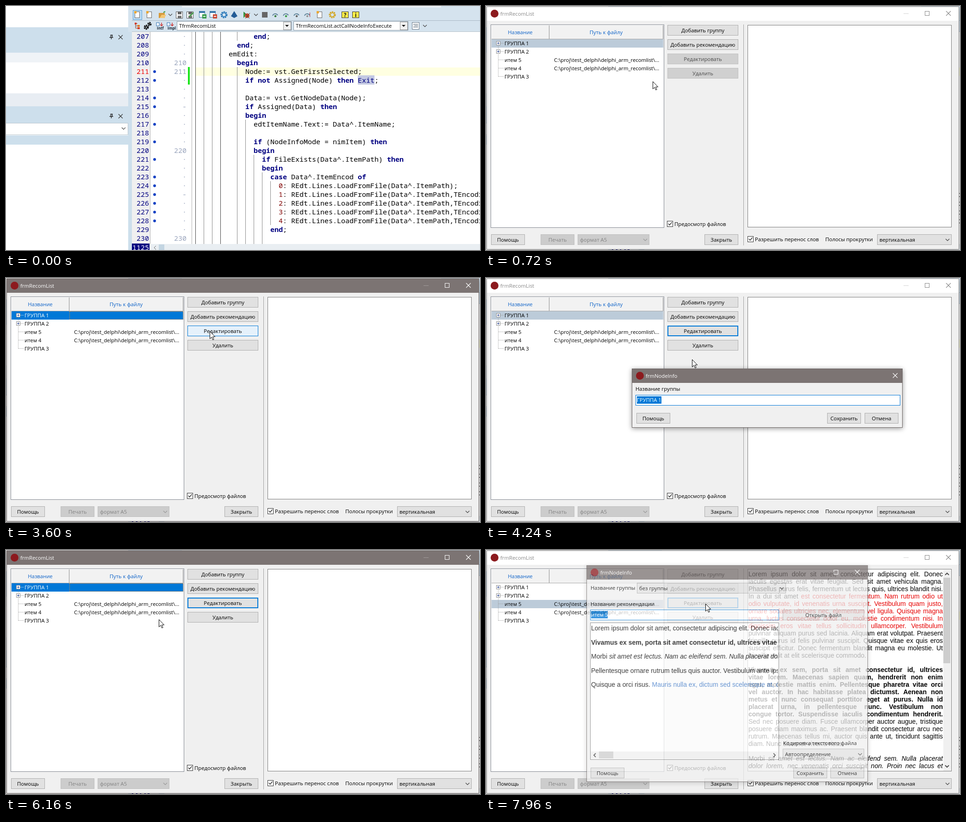
Recreate the animation shown at these times as an HTML page. Size 1024x528 px, loop 8 s.

```html
<!DOCTYPE html>
<html lang="ru">
<head>
<meta charset="utf-8">
<title>frmRecomList</title>
<style>
html, body { margin: 0; width: 100%; height: 100%; overflow: hidden; background: #fff; }
#stage { left: 0; top: 0; width: 1024px; height: 528px; overflow: hidden; }
div, svg { position: absolute; box-sizing: border-box; white-space: pre; }
svg { left: 0; top: 0; }
#stage { font: 11.3px/18px "Open Sans", "Noto Sans", sans-serif; color: #000; }
.mono { font: 15px/19px "Noto Sans Mono", "DejaVu Sans Mono", monospace; }
.mono b { color: #000080; }
.rich { font: 14px/16px "Liberation Sans", Arial, sans-serif; white-space: nowrap; }
.btn { background: #e1e1e1; border: 1px solid #adadad; text-align: center; line-height: 21px; }
.off { background: #ccc; border-color: #bfbfbf; color: #838383; }
.dim { color: #4a4a4a; background: #d0d0d0; }
.hot { background: #e5f1fb; border-color: #0078d7; }
.warm { background: #e3e9f0; border-color: #7aa5cc; }
.foc { border: 2px solid #0078d7; line-height: 19px; }
</style>
</head>
<body>
<div id="stage"><div id="ide"></div><div id="front"></div></div>
<script>
const box = (x, y, w, h, css = '', body = '', cls = '') =>
  `<div class="${cls}" style="left:${x}px;top:${y}px;width:${w}px;height:${h}px;${css}">${body}</div>`;
const fill = (x, y, w, h, color) => box(x, y, w, h, 'background:' + color);
const text = (x, cy, s, css = '') => `<div style="left:${x}px;top:${cy - 9}px;${css}">${s}</div>`;
const mono = (x, cy, s, css = '') => `<div class="mono" style="left:${x}px;top:${cy - 10}px;${css}">${s}</div>`;
const svg = body => `<svg width="1024" height="528" fill="none">${body}</svg>`;
const path = (d, color, w = 1, paint = 'none') => `<path d="${d}" stroke="${color}" stroke-width="${w}" fill="${paint}"/>`;
const draw = (...a) => svg(path(...a));
const chevron = (x, y, c = '#444') => draw(`M${x - 4} ${y - 2}l4 4l4 -4`, c, 1.2);
const button = (x, y, w, s, cls = '') => box(x, y, w, 23, '', s, 'btn ' + cls);
const combo = (x, y, w, s, cls = '') => box(x, y, w, 23, 'text-align:left;padding-left:4px', s, 'btn ' + cls) +
  chevron(x + w - 9, y + 12, cls ? '#999' : '#444');
const check = (x, cy, s) => box(x, cy - 7, 13, 13, 'background:#fff;border:1px solid #333') +
  draw(`M${x + 3} ${cy - 1}l2.5 3l5 -6`, '#222', 1.3) + text(x + 16, cy, s);

// ---- Code editor behind the windows ----
const load = n => [20, n + ': REdt.Lines.LoadFromFile(Data^.ItemPath' + (n ? ',TEncoding' : ');')];
const code = [[14, 'end;'], [10, 'end;'], [8, 'emEdit:'], [10, 'begin'],
  [12, 'Node:= vst.GetFirstSelected;'], [12, 'if not Assigned(Node) then Exit;'], [0, ''],
  [12, 'Data:= vst.GetNodeData(Node);'], [12, 'if Assigned(Data) then'], [12, 'begin'],
  [14, 'edtItemName.Text:= Data^.ItemName;'], [0, ''], [14, 'if (NodeInfoMode = nimItem) then'],
  [14, 'begin'], [16, 'if FileExists(Data^.ItemPath) then'], [16, 'begin'],
  [18, 'case Data^.ItemEncod of'], ...[0, 1, 2, 3, 4].map(load), [18, 'end;'], [0, '']];
const paint = s => s.replace(/\b(begin|end|if|not|then|case|of)\b/g, '<b>$1</b>')
  .replace(/^(\d)/, '<span style="color:#800000">$1</span>')
  .replace('Exit', '<span style="color:#000080;background:#c4c9e2">Exit</span>');

function editor() {
  let h = fill(272, 56, 40, 459, '#f0f0f0') + fill(311, 56, 1, 459, '#b4b4b4') +
    fill(410, 133, 614, 18, '#ffffe1') + fill(393, 132, 4, 38, '#1ee61e') +
    fill(401, 56, 1, 459, '#b0b0b0');
  const guides = [[409, 56, 515], [427, 56, 515], [445, 56, 515], [463, 56, 515], [499, 56, 75],
    [499, 132, 515], [517, 246, 515], [535, 322, 515], [553, 360, 515], [571, 379, 474]];
  guides.forEach(([x, a, b]) => h += fill(x, a, 1, b - a, x == 409 || x == 463 ? '#444' : '#8a8a8a'));
  code.forEach(([col, s], i) => {
    const n = 207 + i, y = 66 + 19 * i;
    const mark = n % 10 == 0 || n == 211 ? n : n % 5 ? '·' : '-';
    h += mono(282, y, n, `color:${n == 211 ? '#f00000' : '#000080'}`) +
      mono(350, y, mark, 'width:40px;text-align:right;color:#9aa5bd') +
      mono(409 + 9 * col, y, paint(s));
    if (n > 210 && s && !/^(begin|end)/.test(s))
      h += box(318, y - 3, 6, 6, 'border-radius:3px;background:#1643c4');
  });
  return h + fill(272, 515, 752, 13, '#e9eef2') + fill(330, 516, 12, 12, '#c3d5e2') +
    draw('M324 519l-4 4l4 4', '#666') + fill(272, 514, 38, 14, '#000080') + mono(273, 523, '1125', 'color:#fff');
}

function toolbar() {
  const r = (x, y, w, h, f, s = 'none') => `<rect x="${x}" y="${y}" width="${w}" height="${h}" fill="${f}" stroke="${s}"/>`;
  const page = x => r(x - 5.5, 12.5, 10, 13, '#fff', '#666') + r(x - 7, 11, 5, 5, '#eca832');
  const disk = x => r(x - 7.5, 12.5, 14, 14, '#fff', '#555') + r(x - 4, 13, 8, 5, '#666') + r(x - 4, 21, 8, 5, '#777');
  const form = (x, c) => r(x - 7.5, 11.5, 12, 13, '#fff', '#3676a8') + r(x - 7, 12, 11, 3, '#3676a8') + r(x - 1, 18, 9, 9, c) +
    path(`M${x + 1} 22.5h5`, '#fff', 2);
  const gear = (x, y, q, c) => `<circle cx="${x}" cy="${y}" r="${q}" stroke="${c}" stroke-width="3" stroke-dasharray="3 1.4"/>` +
    `<circle cx="${x}" cy="${y}" r="${q - 2}" stroke="${c}" stroke-width="1.5"/>`;
  const step = (x, c) => path(`M${x - 6} 21a6 6 0 0 1 11 -1`, '#557b91', 1.6) + `<circle cx="${x}" cy="22" r="2.3" fill="${c}"/>`;
  const units = (x, s) => r(x - 8, 36, 6, 7, '#fff', '#2b6cb0') + path(`M${x + 3} 36v7m-3 -3l3 3l3 -3`, '#c33', 1.5) +
    `<text x="${x - 7}" y="51" font-size="8" font-weight="700" fill="#123">${s}</text>`;
  const help = (x, s) => r(x - 6.5, 12.5, 14, 13, '#fff04a', '#333') +
    `<text x="${x + .5}" y="23.5" font-size="12" font-weight="700" fill="#111" text-anchor="middle">${s}</text>`;
  const list = (x, s) => box(x, 33, 248, 20, 'background:#fff;border:1px solid #8b9aa6;padding-left:4px', s) +
    box(x + 230, 34, 17, 18, 'background:#f0f0f0;border:1px solid #999') +
    draw(`M${x + 234} 41h8l-4 4z`, 'none', 0, '#111');
  return fill(264, 0, 760, 56, '#d5e3ee') + fill(380, 0, 560, 3, '#eef3f7') + fill(272, 31, 752, 1, '#a9b8c4') + fill(272, 55, 752, 1, '#b5c1ca') +
    box(274, 9, 20, 21, 'background:#bcdcf4;border:1px solid #5a9fd4') +
    svg(page(284) + page(310) + r(330, 15, 13, 11, '#d69a3b') + path('M332 26l4 -7h10l-4 7z', 'none', 0, '#f3c673') +
      path('M340 14l4 -2', '#3b9b45', 2) + disk(375) + disk(398) + path('M396 23l9 -9', '#4b9c4f', 3) +
      form(425, '#359a48') + form(448, '#c94732') + gear(471, 19, 6, '#2475b8') +
      path('M493 11l7 11l-7 4l-7 -4z', 'none', 0, '#245c96') +
      path('M513 12v14l7 -7z', 'none', 0, '#3b9b45') + `<circle cx="521" cy="21" r="5" fill="#c74a2d"/>` + path('M515 14l11 13m1 -12l-10 12', '#493528') +
      r(553, 13, 12, 12, '#666') + step(582, '#3b7d42') + step(605, '#3b9b45') + step(628, '#666') + step(651, '#999') + path('M656.5 14v10', '#b34') +
      page(678) + gear(705, 19, 6, '#d2a520') + help(732, '?') + help(755, 'i') +
      path('M280 38h4m-4 0v10h5m-5 -5h5', '#8a3a20') + r(278, 36, 4, 4, '#d33c24') + r(284, 41, 5, 4, '#e07a22') + r(284, 46, 5, 4, '#d33c24') +
      gear(303, 46, 4, '#111') + gear(310, 39, 3, '#111') + units(333, 'Intf') + units(356, 'Impl') +
      r(877.5, 35.5, 15, 15, '#fff', '#678') + path('M880 39.5h10m-8 3h8m-10 3h10', '#456')) +
    chevron(355, 19) + chevron(540, 19) + chevron(905, 43) + list(369, 'TfrmRecomList') + list(621, 'TfrmRecomList.actCallNodeInfoExecute');
}

function panels() {
  const pin = y => draw(`M225.5 ${y - 4}h5m-4 0v5m3 -5v5m-6 0h8m-4 0v4`, '#222', 1.3) +
    draw(`M243 ${y - 4}l9 9m0 -9l-9 9`, '#333', 1.2);
  return fill(0, 46, 264, 55, '#cddfec') + fill(0, 101, 264, 21, '#eff3f7') + fill(0, 189, 264, 28, '#e8edf3') +
    fill(0, 217, 264, 36, '#cddfec') + box(-1, 253, 265, 26, 'border:1px solid #b9c5ce') +
    fill(0, 280, 264, 20, '#cddfec') + fill(264, 0, 8, 528, '#cddfec') + chevron(254, 265) + pin(67) + pin(238);
}
document.getElementById('ide').innerHTML = panels() + editor() + toolbar();

// ---- Windows ----
function win(x, y, w, h, title, active, body, open = 1, tools = 0) {
  const fg = active ? '#fff' : '#888', X = x + w - (tools ? 23 : 16), cy = y + 15;
  const cross = path(`M${X - 5} ${cy - 5}l10 10m0 -10l-10 10`, fg, 1.1);
  const max = tools ? `<rect x="${X - 50.5}" y="${cy - 4.5}" width="9" height="9" stroke="${fg}"/>` : '';
  const min = tools > 1 ? path(`M${X - 97} ${cy + .5}h11`, active ? '#a19b9a' : '#d4d4d4') : '';
  return box(0, 0, 1024, 528, `opacity:${open};transform-origin:${x + w / 2}px ${y + h / 2}px;transform:scale(${.92 + .08 * Math.min(1, open * 1.34)})`,
    box(x, y, w, h, `background:#f0f0f0;border:1px solid ${active ? '#6d6665' : '#8c8c8c'};box-shadow:0 2px 10px rgba(0,0,0,${.4 * open * open})`) +
    fill(x + 1, y + 1, w - 2, 30, active ? '#7c7473' : '#fff') +
    box(x + 9, cy - 8, 17, 17, 'border-radius:50%;background:#8c1a1e') +
    text(x + 30, cy + .5, title, 'color:' + fg) + svg(cross + max + min) + body);
}

const red = '<span style="color:#e60000">', bold = '<span style="font-weight:700">', ital = '<span style="font-style:italic">';
const lorem = `Lorem ipsum dolor sit amet, consectetur adipiscing elit. Donec
iaculis egestas erat vitae feugiat. Sed sit amet vehicula magna.
Phasellus purus felis, fermentum ut lectus quis, ultrices blandit nisi.
In a dui sit amet ${red}est consectetur fermentum. Nam rutrum odio ut
${red}odio vulputate, id venenatis urna suscipit. Vestibulum quam justo,
${red}ornare sodales ultricies nec, elementum vel ligula. Quisque magna
${red}urna, luctus consectetur dolor eu, molestie condimentum nisi. In
${red}dignissim eros vitae tellus sollicitudin ullamcorper. Vestibulum
pulvinar aliquam purus sed lacinia. Aliquam erat volutpat. Praesent
fringilla purus id felis pulvinar suscipit. Quisque vitae ex quis eros
suscipit efficitur. Donec fermentum blandit magna eu molestie. Ut
fringilla velit at elit scelerisque commodo.

${bold}Vivamus ex sem, porta sit amet consectetur id, ultrices
${bold}vitae lorem. Maecenas sapien quam, hendrerit non enim
${bold}eget, molestie mattis enim. Pellentesque pharetra vitae orci
${bold}vel auctor. In hac habitasse platea dictumst. Aenean non
${bold}metus et nunc consequat porttitor eget at purus. Nulla id
${bold}placerat urna, in pellentesque nunc. Vestibulum non
${bold}congue tortor. Suspendisse iaculis condimentum hendrerit.
Sed nec posuere diam. Fusce ullamcorper auctor augue, tristique
posuere diam maximus ac. Praesent blandit consectetur arcu nec
rutrum. Maecenas tellus mi, auctor quis ante ut, tincidunt sagittis
diam. Nunc sit amet viverra risus.

Morbi ${ital}sit amet est lectus. Nam ac eleifend sem. Nulla placerat
${ital}dolor lorem, nec venenatis orci suscipit non. Proin nec lacus et`.split('\n');
const close = s => s + (s.includes('<span') ? '</span>' : '');

const preview = lorem.map((s, i) => box(567, Math.round(52 + 15.96 * i) - 8, 420, 16,
  /(commodo|risus)\.$/.test(s) ? '' : 'text-align:justify;text-align-last:justify', close(s), 'rich')).join('') +
  fill(988, 43, 16, 435, '#f0f0f0') + fill(988, 60, 15, 185, '#cdcdcd') +
  draw('M992 54l4 -4l4 4M992 466l4 4l4 -4', '#444', 1.8);

function tree(sel, active) {
  const rows = ['ГРУППА 1', 'ГРУППА 2', 'итем 5', 'итем 4', 'ГРУППА 3'];
  let h = box(10, 40, 375, 440, 'background:#fff;border:1px solid #828790') + fill(12, 42, 371, 29, '#f2f2f2') +
    fill(12, 71, 371, 1, '#a8a8a8') + fill(136, 42, 1, 29, '#8c8c8c') + fill(382, 42, 1, 29, '#8c8c8c') +
    box(12, 48, 124, 18, 'text-align:center;color:#0d62c8', 'Название') +
    box(137, 48, 245, 18, 'text-align:center;color:#0d62c8', 'Путь к файлу') +
    fill(12, 72, 371, 18, '#fff') + fill(12, 72 + 18 * sel, 371, 18, active ? '#0078d7' : '#bccbd9');
  if (active) h += sel ? box(12, 108, 125, 18, 'border:1px dotted #e88a30') : box(137, 72, 246, 18, 'border:1px dotted #e88a30');
  h += box(26, 81, 1, 72, 'border-left:1px dotted #999');
  rows.forEach((s, i) => {
    const y = 81 + 18 * i, lit = active && i == sel, css = lit ? 'color:#fff' : '';
    h += box(26, y - 1, 12, 1, `border-top:1px dotted ${lit ? '#fff' : '#999'}`) + text(40, y, s, css);
    if (i < 2) h += box(22, y - 5, 9, 9, 'background:#fff;border:1px solid #919191') + draw(`M24 ${y - .5}h5m-2.5 -2.5v5`, '#26418f');
    if (i == 2 || i == 3) h += text(147, y, 'C:\\proj\\test_delphi\\delphi_arm_recomlist\\...', css);
  });
  return h;
}

const during = (t, a, b) => t >= a && t < b;
const clamp = v => Math.max(0, Math.min(1, v));

function mainWindow(t) {
  const active = during(t, 2000, 3920) || during(t, 5720, 7840), picked = t >= 6640;
  const edit = t < 1080 ? 'off dim' : during(t, 3960, 6640) || t >= 7800 ? 'foc' :
    during(t, 3400, 3960) || t >= 7320 ? 'hot' : '';
  const del = t < 1080 ? 'off dim' : during(t, 7040, 7160) ? 'hot' : during(t, 7160, 7360) ? 'warm' : '';
  return win(1, 1, 1021, 526, 'frmRecomList', active, tree(picked ? 2 : 0, active) +
    button(392, 41, 153, 'Добавить группу') + button(392, 72, 153, 'Добавить рекомендацию') +
    button(392, 103, 153, 'Редактировать', edit) + button(392, 134, 153, 'Удалить', del) +
    check(391, 472, 'Предосмотр файлов') + button(11, 494, 73, 'Помощь') + button(118, 494, 73, 'Печать', 'off') +
    combo(198, 494, 155, 'формат A5', 'off') + button(472, 494, 73, 'Закрыть') + fill(556, 40, 1, 478, '#a0a0a0') +
    box(565, 41, 441, 438, 'background:#fff;border:1px solid #7a7a7a') + (picked ? preview : '') +
    check(565, 505, 'Разрешить перенос слов') + text(733, 505, 'Полосы прокрутки') + combo(845, 494, 161, 'вертикальная'),
    clamp((t - 140) / 260), 2);
}

const picked = (x, cy, s) => text(x, cy, s, 'color:#fff;background:#0078d7;height:16px;line-height:16px;margin-top:1px');

function groupDialog(t) {
  const open = clamp((t - 3920) / 200) * clamp((5880 - t) / 200);
  const caret = t >= 4800 && Math.floor(t / 520) % 2 ? fill(381, 256, 1, 16, '#000') : '';
  return win(315, 196, 585, 128, 'frmNodeInfo', t < 5720, text(323, 240, 'Название группы') +
    box(323, 253, 572, 23, 'background:#fff;border:1px solid #0078d7') + picked(326, 264, 'ГРУППА 1') + caret +
    button(325, 292, 73, 'Помощь') + button(737, 292, 73, 'Сохранить') +
    button(818, 292, 73, 'Отмена', during(t, 5360, 5760) ? 'hot' : ''), open);
}

function itemDialog() {
  const lines = ['Lorem ipsum dolor sit amet, consectetur adipiscing elit. Donec iaculis',
    bold + 'Vivamus ex sem, porta sit amet consectetur id, ultrices vitae',
    `Morbi ${ital}sit amet est lectus. Nam ac eleifend sem. Nulla placerat dolor`,
    'Pellentesque ornare rutrum tellus quis auctor. Vestibulum ante ipsum',
    'Quisque a orci risus. <span style="color:#3c78c8">Mauris nulla ex, dictum sed scelerisque at, diam'];
  const memo = lines.map((s, i) => box(1, 3 + 30.5 * i, 404, 16, 'overflow:hidden', close(s), 'rich')).join('');
  return win(217, 33, 608, 469, 'frmNodeInfo', true, text(226, 82, 'Название группы') +
    combo(326, 71, 322, 'без группы') + text(226, 117, 'Название рекомендации') +
    box(225, 129, 408, 23, 'background:#fff;border:1px solid #0078d7') + picked(227, 140, 'итем 5') +
    button(641, 129, 176, 'Открыть файл') + box(225, 157, 408, 297, 'background:#fff;border:1px solid #7a7a7a', memo) +
    fill(226, 436, 406, 16, '#f0f0f0') + fill(244, 436, 31, 15, '#cdcdcd') +
    draw('M237 440l-4 4l4 4M621 440l4 4l-4 4', '#444', 1.8) + text(642, 418, 'Кодировка текстового файла') +
    combo(641, 430, 176, 'Автоопределение') + button(226, 471, 73, 'Помощь') +
    button(664, 471, 73, 'Сохранить') + button(744, 471, 73, 'Отмена'), .75, 1);
}

// ---- Pointer: time, x, y ----
const track = [[200, 360, 163], [720, 360, 163], [1040, 352, 265], [1880, 156, 81], [2160, 156, 81], [2800, 37, 96],
  [2840, 37, 96], [3080, 439, 96], [3240, 439, 96], [3480, 440, 115], [3920, 440, 115], [4600, 452, 249], [4640, 452, 289],
  [4760, 452, 289], [5360, 840, 308], [5560, 861, 303], [5720, 861, 303], [6160, 330, 150], [6400, 330, 150], [6600, 80, 117],
  [6720, 80, 117], [7080, 470, 146], [7160, 485, 110], [7240, 475, 114], [7440, 474, 116], [8000, 474, 116]];
const clicks = [2000, 3800, 5600, 6640, 7680];

function pointer(t) {
  const i = track.findIndex(k => k[0] > t), [a, ax, ay] = track[i - 1], [b, bx, by] = track[i];
  const p = (t - a) / (b - a), e = p * p * (3 - 2 * p);
  const x = Math.round(ax + (bx - ax) * e), y = Math.round(ay + (by - ay) * e);
  const glow = clicks.some(c => during(t, c, c + 120)) ? `<circle cx="${x}" cy="${y}" r="12" fill="#ffe600" opacity=".65"/>` : '';
  return svg(glow + path(`M${x + .5} ${y + .5}v16l3.7 -3.5l2.5 5.7l2.4 -1l-2.5 -5.6h5z`, '#000', 1, '#fff'));
}

const front = document.getElementById('front');
let last = -1;
function frame(now) {
  const t = Math.floor(now % 8000 / 40) * 40;
  if (t != last) {
    last = t;
    front.innerHTML = t < 200 ? '' : mainWindow(t) + (during(t, 3960, 5880) ? groupDialog(t) : '') +
      (t >= 7960 ? itemDialog() : '') + pointer(t);
  }
  requestAnimationFrame(frame);
}
requestAnimationFrame(frame);
</script>
</body>
</html>
```
